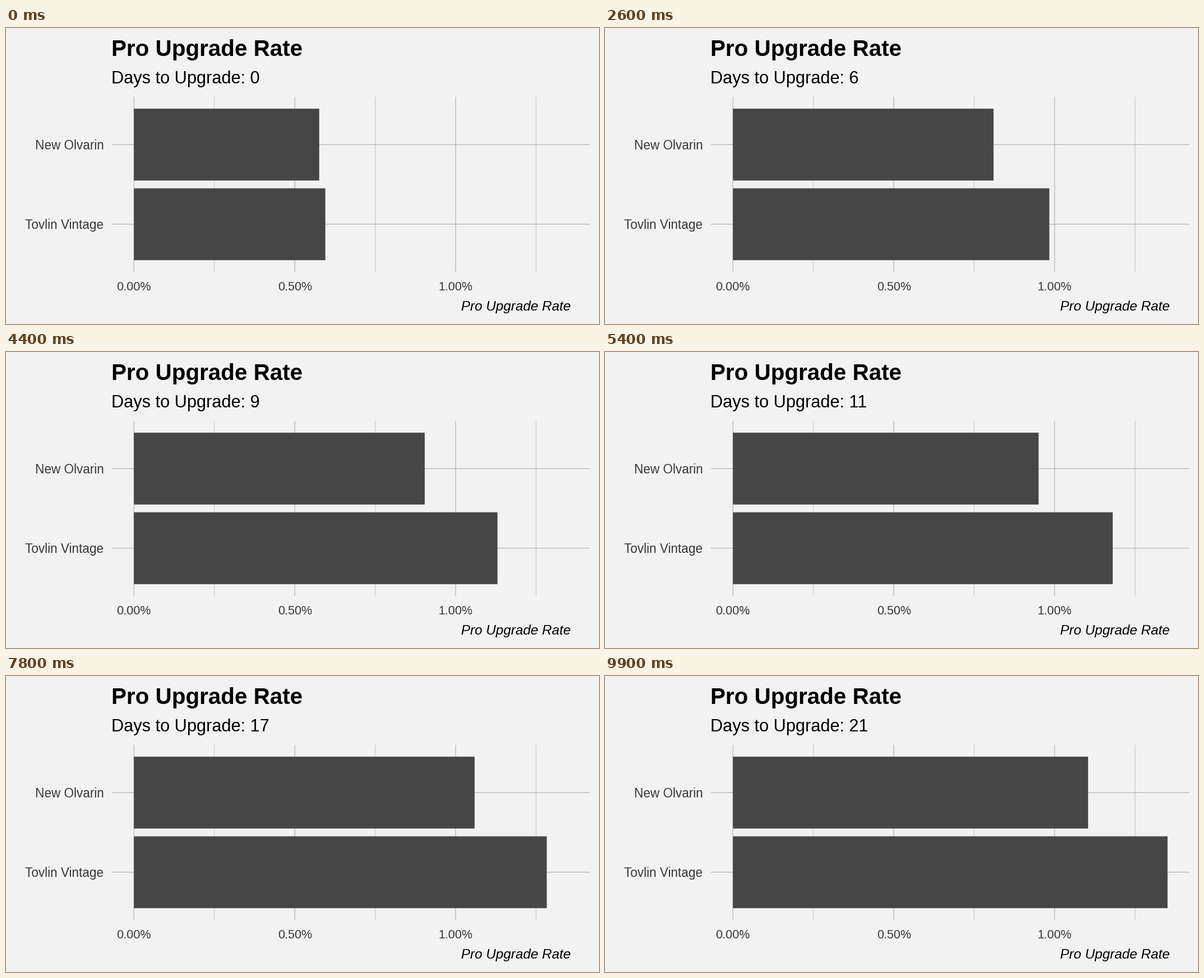
Write a matplotlib script that moves like this. It is 1058 px wide and 529 px high and loops after 10 s.

```python
import numpy as np
import matplotlib.pyplot as plt
from matplotlib.animation import FuncAnimation
from matplotlib.patches import Rectangle

W, H, DPI = 1058, 529, 64
FRAMES, INTERVAL, LAST_DAY = 100, 100, 21
X0, PX_PER_PCT = 228.2, 574
BAR_HEIGHT = 128.4
BACK, BAR, LABEL = "#f2f2f2", "#464646", "#383838"

# Upgrade rate in percent at a few key days, linear in between
KEY_DAYS = [0, 1, 3, 7, 10, 14, 17, 21]
SERIES = {
    "New Olvarin": [0.576, 0.66, 0.746, 0.848, 0.92, 1.003, 1.069, 1.104],
    "Tovlin Vintage": [0.595, 0.747, 0.854, 1.06, 1.15, 1.234, 1.292, 1.351],
}

plt.rcParams["font.family"] = "Liberation Sans"
fig = plt.figure(figsize=(W / DPI, H / DPI), dpi=DPI, facecolor=BACK)
ax = fig.add_axes([0, 0, 1, 1])
ax.set_xlim(0, W)
ax.set_ylim(H, 0)
ax.axis("off")


def text(x, y, s, px, color="black", **kw):
    return ax.text(x, y, s, fontsize=px * 72 / DPI, color=color,
                   va="baseline", **kw)


def line(xs, ys, alpha):
    ax.plot(xs, ys, color="black", alpha=alpha, lw=72 / DPI, snap=False,
            solid_capstyle="butt", zorder=1)


def bar(y):
    return ax.add_patch(Rectangle((X0, y - BAR_HEIGHT / 2), 0, BAR_HEIGHT,
                                  facecolor=BAR, edgecolor="none",
                                  snap=False, zorder=2))


for i in range(6):
    x = X0 + i * PX_PER_PCT / 4
    line([x, x], [123, 436], 0.19 if i % 2 else 0.32)
    if i % 2 == 0:
        text(x, 469, f"{i / 4:.2f}%", 21.5, LABEL, ha="center")

bars = []
for i, name in enumerate(SERIES):
    y = 208.4 + 142.3 * i
    line([189, 1042], [y, y], 0.32)
    text(174.5, y + 8.5, name, 22.5, LABEL, ha="right")
    bars.append(bar(y))

text(188.5, 50, "Pro Upgrade Rate", 40.4, weight="bold")
subtitle = text(188, 99, "", 30.8)
text(1008, 505, "Pro Upgrade Rate", 24.3, style="italic", ha="right")


def draw(i):
    day = LAST_DAY * i / (FRAMES - 1)
    for patch, rates in zip(bars, SERIES.values()):
        patch.set_width(PX_PER_PCT * np.interp(day, KEY_DAYS, rates))
    subtitle.set_text(f"Days to Upgrade: {round(day)}")
    return *bars, subtitle


anim = FuncAnimation(fig, draw, frames=FRAMES, interval=INTERVAL,
                     repeat=True, repeat_delay=0)
plt.show()
```
